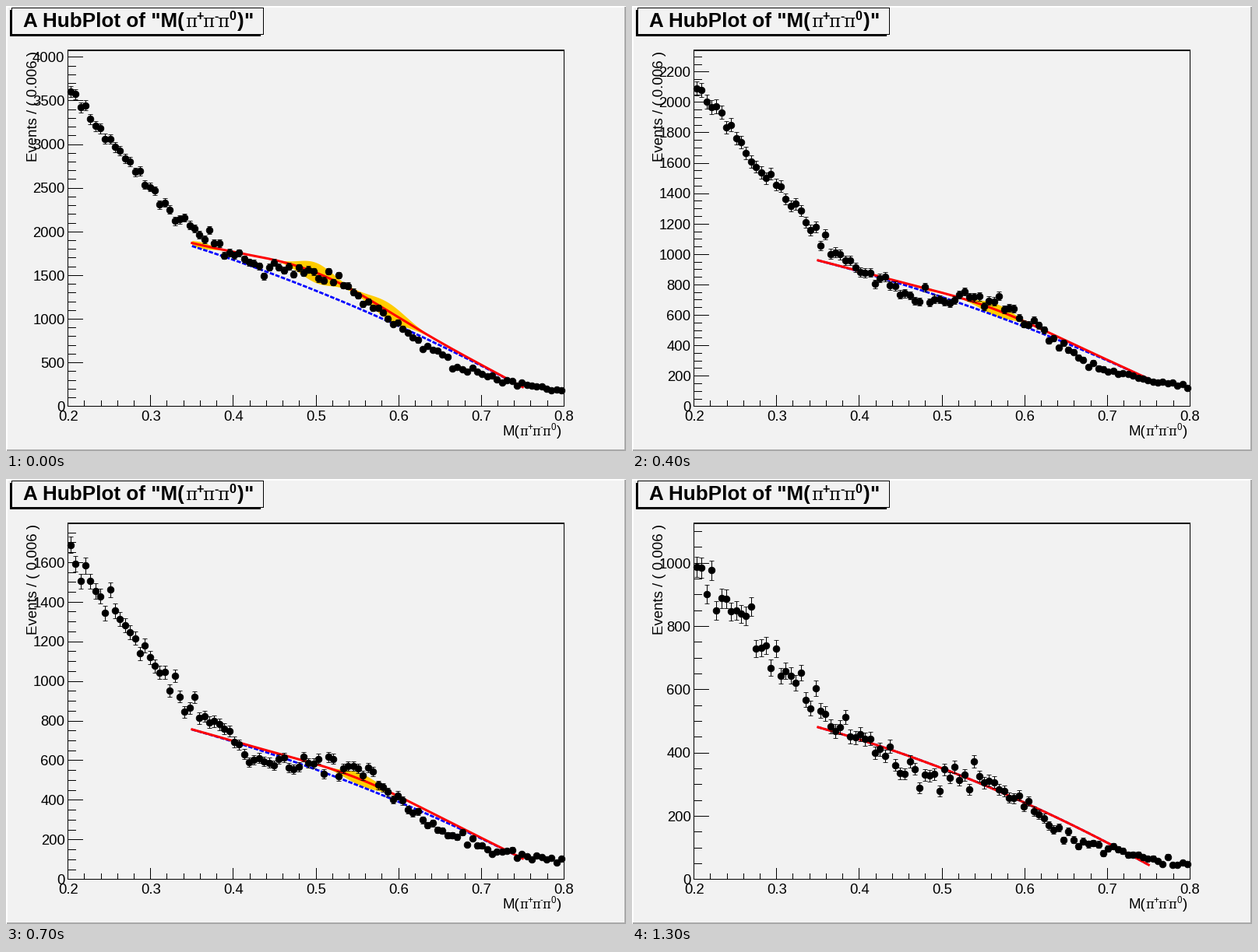
Animation of 796 by 572 pixels, one loop 1.6 s. Source, as a matplotlib script:

```python
import numpy as np
import matplotlib.pyplot as plt
from matplotlib.animation import FuncAnimation
from matplotlib.patches import Rectangle

W, H, PT = 796, 572, 0.72            # stage in pixels, points per pixel
LEFT, RIGHT, TOP, BASE = 79.6, 716.4, 57.2, 514.8
BG, GOLD = "#f2f2f2", "#ffcc00"

fig = plt.figure(figsize=(W / 100, H / 100), dpi=100, facecolor=BG)
ax = fig.add_axes([0, 0, 1, 1])
ax.set(xlim=(0, W), ylim=(H, 0))
ax.axis("off")
ax.autoscale(False)


def box(x0, y0, x1, y1, color, **kw):
    ax.add_patch(Rectangle((x0, y0), x1 - x0, y1 - y0, fc=color, lw=0,
                           aa=False, **kw))


def hline(x0, x1, y):
    """One pixel row, snapped as an integer raster would."""
    return ax.plot([int(x0), int(x1) + 1], [int(y) + 0.5] * 2, "k", lw=PT,
                   aa=False, snap=False, solid_capstyle="butt")[0]


def vline(x, y0, y1):
    return ax.plot([int(x) + 0.5] * 2, [int(y0), int(y1) + 1], "k", lw=PT,
                   aa=False, snap=False, solid_capstyle="butt")[0]


def text(x, y, s, size=18.5, font="Liberation Sans", **kw):
    return ax.text(x, y, s, fontsize=size * PT, family=font, va="baseline", **kw)


def pions(x, y, size, weight="normal"):
    """Three pi symbols with raised charges, then the closing bracket."""
    for sign, width in zip("+-0", (0.87, 0.73, 0.92)):
        text(x, y, "π", size * 0.88, "DejaVu Serif")
        text(x + 0.56 * size, y - 0.36 * size, sign, size * 0.62, weight=weight)
        x += width * size
    text(x + 0.05 * size, y, ")", size, weight=weight)


def px(mass):
    return LEFT + (mass - 0.2) / 0.6 * (RIGHT - LEFT)


def gauss(x, amp, mean, sigma):
    return amp * np.exp(-0.5 * ((x - mean) / sigma) ** 2)


def draw_static():
    box(0, 0, W, 2, "white")
    box(0, 0, 2, H, "white")
    box(1, H - 2, W, H, "#a9a9a9")
    box(W - 2, 1, W, H, "#a9a9a9")

    box(5, 5, 327, 39, "k")
    box(7, 2, 331, 37, "k")
    box(8, 3, 330, 36, BG)
    text(22, 27, 'A HubPlot of "M(', 26, weight="bold")
    pions(230, 27, 26, "bold")
    text(305.5, 27, '"', 26, weight="bold")

    vline(LEFT, TOP, BASE)
    vline(RIGHT, TOP, BASE)
    hline(LEFT, RIGHT, BASE)
    hline(LEFT, RIGHT, TOP)
    hline(LEFT, RIGHT, TOP - 1)
    for k in range(31):
        x, major = px(0.2 + 0.02 * k), k % 5 == 0
        vline(x, BASE - (14 if major else 7), BASE)
        if major:
            text(x, 533, f"{0.2 + 0.02 * k:.1f}", ha="center")

    text(637.5, 552, "M(", 18.6)
    pions(659, 552, 18.6)
    text(40.5, 200.5, "Events / ( 0.006 )", 18.6, rotation=90,
         rotation_mode="anchor", ha="left")


# top: (label, height above the base) of the highest tick label; step, minor: ticks
# fall: height, decay, pedestal; bump, peak, bands: gaussians; back: parabola
PLOTS = [
    dict(top=(4000, 449), step=500, minor=100,
         fall=(408, 0.24, -3), bump=(64, 0.525, 0.075),
         back=(308.5, 388, 490), peak=(23.3, 0.502, 0.08),
         bands=[(4, 0.36, 0.015), (13, 0.5, 0.02), (11, 0.587, 0.022)]),
    dict(top=(2500, 382), step=500, minor=100,
         fall=(408, 0.225, 12), bump=(66, 0.56, 0.065),
         back=(315.5, 382.5, 473), peak=(26, 0.562, 0.036), bands=[]),
    dict(top=(2200, 430), step=200, minor=50,
         fall=(400, 0.225, 10), bump=(52, 0.565, 0.06),
         back=(327, 392.5, 479.5), peak=(8, 0.558, 0.068),
         bands=[(2, 0.48, 0.01), (8, 0.565, 0.02)]),
    dict(top=(1600, 407.5), step=200, minor=50,
         fall=(412, 0.22, 8), bump=(55, 0.55, 0.06),
         back=(322, 393.5, 488), peak=(9, 0.55, 0.07),
         bands=[(8, 0.555, 0.02)]),
    dict(top=(1400, 440), step=200, minor=50,
         fall=(408, 0.22, 6), bump=(46, 0.56, 0.05),
         back=(332, 404, 497), peak=(24.5, 0.55, 0.046), bands=[]),
    dict(top=(1000, 406.5), step=200, minor=50,
         fall=(408, 0.245, -4), bump=(40, 0.56, 0.05),
         back=(319, 393, 496), peak=(0, 0.55, 0.05), bands=[]),
]


def draw_scale(p, scale):
    out = []
    for v in range(0, int((BASE - TOP) / scale) + 1, p["minor"]):
        y, major = BASE - v * scale, v % p["step"] == 0
        out.append(hline(LEFT, LEFT + (19 if major else 10), y))
        if major:
            out.append(text(75.5, y + 6.3, str(v), ha="right"))
    return out


def draw_fit(p):
    m = np.linspace(0.35, 0.75, 300)
    t = (m - 0.35) / 0.4
    start, mid, end = p["back"]
    back = (start + t * (4 * mid - 3 * start - end)
            + 2 * t * t * (start - 2 * mid + end))
    fit = back - gauss(m, *p["peak"])
    out = []
    if p["bands"]:
        half = sum(gauss(m, *b) for b in p["bands"])
        out.append(ax.fill_between(px(m), fit - half, fit + half, color=GOLD,
                                   lw=0, zorder=2))
    out += ax.plot(px(m), back, "blue", lw=2.8 * PT, zorder=3,
                   ls=(0, (2, 0.7)), dash_capstyle="butt")
    out += ax.plot(px(m), fit, "red", lw=3 * PT, zorder=4)
    return out


def draw_data(p, scale, rng):
    m = 0.203 + 0.006 * np.arange(100)
    height, decay, pedestal = p["fall"]
    mean = (height * np.exp(-((m - 0.2) / decay) ** 1.15) + pedestal
            + gauss(m, *p["bump"]))
    count = rng.poisson(mean / scale)
    dots = ax.errorbar(px(m), BASE - count * scale, yerr=np.sqrt(count) * scale,
                       fmt="ko", ms=6.2, mew=0.6, elinewidth=PT,
                       capsize=2.6 * PT, capthick=PT, zorder=5)
    return list(dots.get_children())


def draw_plot(p, rng):
    label, height = p["top"]
    scale = height / label
    return draw_scale(p, scale) + draw_fit(p) + draw_data(p, scale, rng)


draw_static()
rng = np.random.default_rng(7)
groups = [draw_plot(p, rng) for p in PLOTS]


def update(n):
    shown = (n + 2) // 3             # the first plot stays 100 ms, the rest 300
    for i, group in enumerate(groups):
        for artist in group:
            artist.set_visible(i == shown)
    return []


anim = FuncAnimation(fig, update, frames=16, interval=100, repeat=True,
                     repeat_delay=0, blit=False)
plt.show()
```
